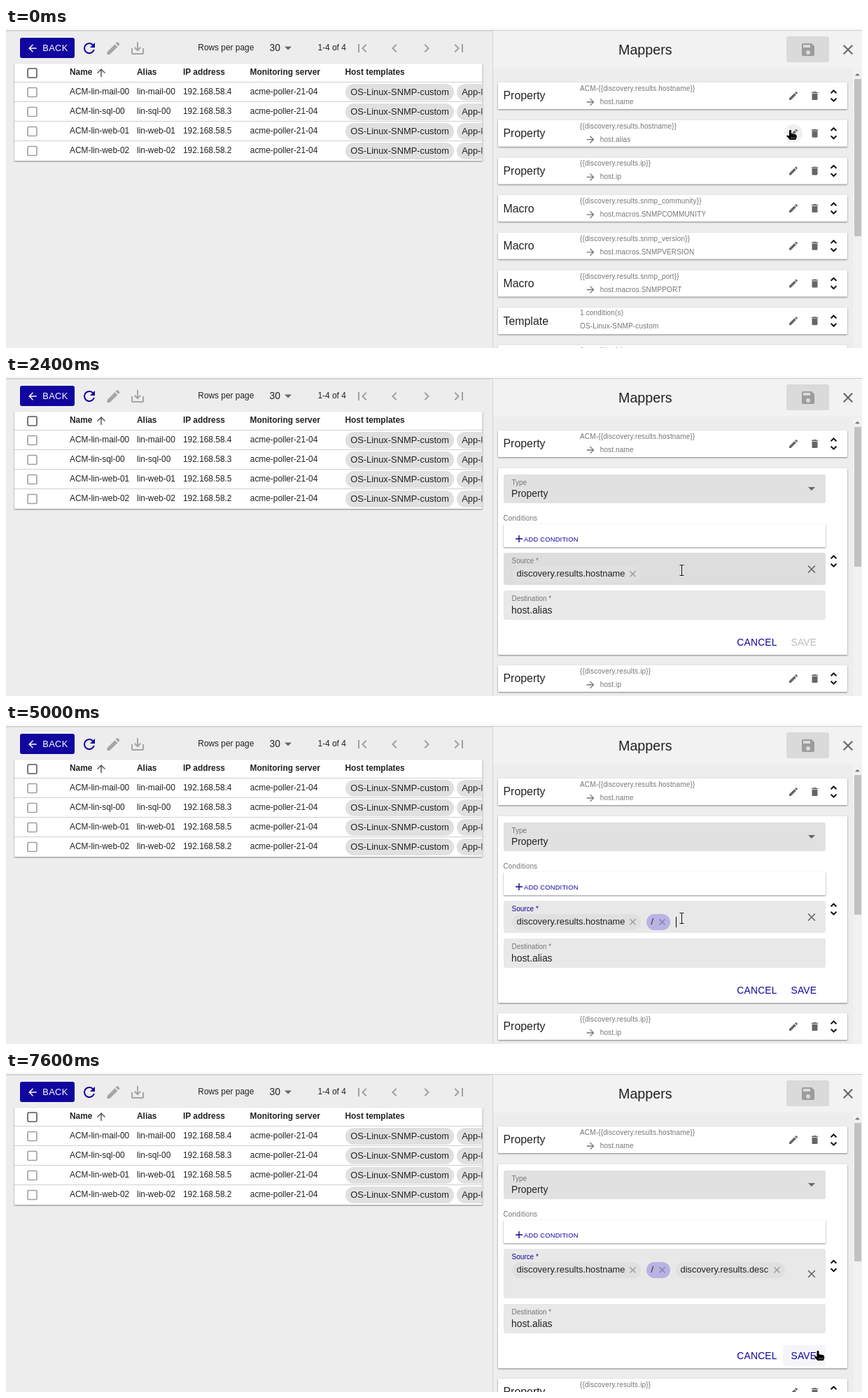
An HTML page for the animation above (8000 ms loop, 1223x458 px).

```html
<!DOCTYPE html>
<html lang="en">
<head>
<meta charset="utf-8">
<title>Mappers</title>
<style>
  html, body { margin: 0; width: 100%; height: 100%; overflow: hidden; background: #ededed; }
  svg { display: block; font-family: "Liberation Sans", Arial, sans-serif; }
  text { white-space: pre; }
  .card { fill: #fff; filter: drop-shadow(0 1px 1px rgba(0, 0, 0, .45)); }
  .menu { fill: #fff; filter: drop-shadow(0 2px 3px rgba(0, 0, 0, .35)); }
</style>
</head>
<body>
<svg width="1223" height="458" viewBox="0 0 1223 458">
  <clipPath id="table"><rect x="12" y="51" width="668.5" height="139"/></clipPath>
  <g id="base"></g>
  <g id="panel"></g>
</svg>
<script>
const LOOP = 8000, BLUE = '#10069f', DARK = '#222', GREY = '#757575';

// Icon outlines on a 24 x 24 grid
const ICONS = {
  back: 'M20 11H7.83l5.59-5.59L12 4l-8 8 8 8 1.41-1.41L7.83 13H20z',
  forward: 'M12 4l-1.41 1.41L16.17 11H4v2h12.17l-5.58 5.59L12 20l8-8z',
  up: 'M4 12l1.41 1.41L11 7.83V20h2V7.83l5.58 5.59L20 12l-8-8z',
  refresh: 'M17.65 6.35A7.96 7.96 0 0 0 12 4a8 8 0 1 0 7.73 10h-2.08A6 6 0 1 1 12 6c1.66 0 3.14.69 4.22 1.78L13 11h7V4z',
  edit: 'M3 17.25V21h3.75L17.81 9.94l-3.75-3.75zM20.71 7.04c.39-.39.39-1.02 0-1.41l-2.34-2.34c-.39-.39-1.02-.39-1.41 0l-1.83 1.83 3.75 3.75z',
  download: 'M19 12v7H5v-7H3v7c0 1.1.9 2 2 2h14c1.1 0 2-.9 2-2v-7zm-6 .67l2.59-2.58L17 11.5l-5 5-5-5 1.41-1.41L11 12.67V3h2z',
  first: 'M18.41 16.59L13.82 12l4.59-4.59L17 6l-6 6 6 6zM6 6h2v12H6z',
  prev: 'M15.41 7.41L14 6l-6 6 6 6 1.41-1.41L10.83 12z',
  next: 'M10 6L8.59 7.41 13.17 12l-4.58 4.59L10 18l6-6z',
  last: 'M5.59 7.41L10.18 12l-4.59 4.59L7 18l6-6-6-6zM16 6h2v12h-2z',
  drop: 'M7 9.5l5 5 5-5z',
  rise: 'M7 14.5l5-5 5 5z',
  save: 'M17 3H5a2 2 0 0 0-2 2v14c0 1.1.9 2 2 2h14c1.1 0 2-.9 2-2V7zm-5 16a3 3 0 1 1 0-6 3 3 0 0 1 0 6zm3-10H5V5h10z',
  close: 'M19 6.41L17.59 5 12 10.59 6.41 5 5 6.41 10.59 12 5 17.59 6.41 19 12 13.41 17.59 19 19 17.59 13.41 12z',
  trash: 'M6 19c0 1.1.9 2 2 2h8c1.1 0 2-.9 2-2V7H6zM19 4h-3.5l-1-1h-5l-1 1H5v2h14z',
  unfold: 'M12 5.83L15.17 9l1.41-1.41L12 3 7.41 7.59 8.83 9zm0 12.34L8.83 15l-1.41 1.41L12 21l4.59-4.59L15.17 15z',
  plus: 'M19 13h-6v6h-2v-6H5v-2h6V5h2v6h6z'
};

const text = (s, x, y, size, fill = DARK, extra = '') =>
  `<text x="${x}" y="${y}" font-size="${size}" fill="${fill}" ${extra}>${s}</text>`;
const box = (x, y, w, h, fill, r = 0) =>
  `<rect x="${x}" y="${y}" width="${w}" height="${h}" rx="${r}" fill="${fill}"/>`;
const card = (x, y, w, h, kind = 'card') =>
  `<rect class="${kind}" x="${x}" y="${y}" width="${w}" height="${h}" rx="1"/>`;
const icon = (name, cx, cy, size = 24, fill = GREY) =>
  `<path transform="translate(${cx - size / 2} ${cy - size / 2}) scale(${size / 24})" fill="${fill}" d="${ICONS[name]}"/>`;
const small = (s, x, y) => text(s, x, y, 10, GREY, 'letter-spacing=".15"');
const button = (s, x, y, fill) => text(s, x, y, 13.86, fill, 'letter-spacing=".2"');
const chip = (s, x, y, w) => box(x, y, w, 24, '#e0e0e0', 12) + text(s, x + 7.2, y + 16.4, 12.87);
const tag = (s, x, w, fill = '#e0e0e0', cross = '#959595') =>
  box(x, 272, w, 23, fill, 11.5) + text(s, x + 6.6, 287.4, 12.87) + icon('close', x + w - 11.5, 283.3, 15.5, cross);
const checkbox = (y, color) =>
  `<rect x="31" y="${y - 6.5}" width="13" height="13" rx="1.5" fill="none" stroke="${color}" stroke-width="1.6"/>`;

function table() {
  const hosts = [['mail-00', 4], ['sql-00', 3], ['web-01', 5], ['web-02', 2]];
  const heads = [['Name', 91], ['Alias', 187], ['IP address', 253], ['Monitoring server', 348.5], ['Host templates', 484.5]];
  let out = card(12, 51, 668.5, 139) + checkbox(64.5, '#555') + icon('up', 136, 64, 18, '#555');
  for (const [s, x] of heads) out += text(s, x, 67, 11.9, DARK, 'font-weight="bold"');
  hosts.forEach(([name, ip], i) => {
    const y = 91.5 + 28 * i, cell = (s, x) => text(s, x, y + 3.7, 11.9);
    out += box(12, y - 14.5, 668.5, 1, '#cfcfcf') + checkbox(y + .5, '#9e9e9e') +
      cell('ACM-lin-' + name, 91) + cell('lin-' + name, 187) + cell('192.168.58.' + ip, 253) +
      cell('acme-poller-21-04', 348.8) + chip('OS-Linux-SNMP-custom', 485, y - 11.5, 155) +
      chip('App-Protocol', 644, y - 11.5, 90);
  });
  return `<g clip-path="url(#table)">${out}</g>`;
}

function base() {
  let out = card(12, 51, 668.5, 139) + table() +
    box(0, 0, 1223, 3, '#fafafa') + box(0, 3, 1223, 1.5, '#cccccc') +
    card(20, 14, 78, 29).replace('class="card"', `fill="${BLUE}"`).replace('rx="1"', 'rx="3"') +
    icon('back', 38, 29, 17, '#fff') + text('BACK', 52.3, 33.2, 12.87, '#fff', 'letter-spacing=".3"') +
    icon('refresh', 119, 29, 24, BLUE) + icon('edit', 153.5, 29, 24, '#a6a6a6') + icon('download', 188, 29, 24, '#a6a6a6') +
    text('Rows per page', 274.3, 32, 11.9) + text('30', 376.5, 33, 13.86) +
    icon('drop', 403, 29, 24, '#666') + text('1-4 of 4', 445.5, 32, 11.9);
  ['first', 'prev', 'next', 'last'].forEach((s, i) => out += icon(s, 509 + 46 * i, 29, 24, '#a0a0a0'));
  return out + box(695, 4, 1, 454, '#d8d8d8') + box(696, 4, 527, 54, '#f2f2f2') + box(696, 58, 527, 400, '#ededed') +
    text('Mappers', 875, 37.8, 19.7) + box(1115, 12, 61, 37, '#dadada', 3) +
    icon('save', 1146, 31, 24, '#9c9c9c') + icon('close', 1203, 31, 24, '#666') +
    box(1210, 59, 13, 399, '#f1f1f1') + icon('rise', 1216.5, 66.5, 17, '#777');
}

const ROWS = [
  ['Property', 'ACM-{{discovery.results.hostname}}', 'host.name'],
  ['Property', '{{discovery.results.hostname}}', 'host.alias'],
  ['Property', '{{discovery.results.ip}}', 'host.ip'],
  ['Macro', '{{discovery.results.snmp_community}}', 'host.macros.SNMPCOMMUNITY'],
  ['Macro', '{{discovery.results.snmp_version}}', 'host.macros.SNMPVERSION'],
  ['Macro', '{{discovery.results.snmp_port}}', 'host.macros.SNMPPORT'],
  ['Template', '1 condition(s)', 'OS-Linux-SNMP-custom'],
  ['Template', '1 condition(s)', 'OS-Linux-SNMP-custom']
];

function row(i, y = 78 + 53.7 * i, hover = false) {
  const [kind, from, to] = ROWS[i], mid = y + 19, plain = kind === 'Template';
  return card(703, y, 499, 38) + text(kind, 710.5, mid + 5.4, 15.9) +
    small(from, 820, y + (plain ? 10.8 : 12)) +
    (plain ? small(to, 820, y + 29.8) : icon('forward', 835, y + 28, 16) + small(to, 848.7, y + 31)) +
    (hover ? `<circle cx="1125" cy="${mid}" r="13" fill="#f0f0f0"/>` : '') +
    icon('edit', 1125, mid, 16, '#666') + icon('trash', 1155.5, mid, 16, '#666') +
    icon('unfold', 1182.5, mid, 24, '#111');
}

const field = (label, y, h, fill, color = GREY) =>
  box(711, y, 460, h, fill, 3) + text(label, 722.5, y + 15.4, 10, color);

function form(t, cur) {
  const added = t >= 7100, grow = added ? 25 : 0, focus = t >= 3000;
  const inType = t >= 1200 && cur.y < 182, inSource = !focus && cur.y > 253;
  const overSave = added && cur.x > 1110 && cur.hand;
  let out = card(703, 132, 499, 267 + grow) +
    field('Type', 141, 41, t < 1200 ? '#e8e8e8' : '#e1e1e1') + text('Property', 722, 173, 13.86) +
    (inType ? icon('close', 1126, 161.5, 17, '#757575') : '') + icon('drop', 1151, 161.5, 24, '#666') +
    small('Conditions', 710.5, 207) + card(711, 212, 460, 33) +
    icon('plus', 733, 233, 17, BLUE) + text('ADD CONDITION', 740, 236.5, 9.4, BLUE, 'letter-spacing=".2"') +
    field('Source *', 253, 46 + grow, inSource ? '#dddddd' : '#e8e8e8', focus ? BLUE : GREY) +
    tag('discovery.results.hostname', 723, 184) +
    (inSource || focus ? icon('close', 1151, 276.5 + grow / 2, 18.5, '#666') : '') +
    icon('unfold', 1182.5, 265 + grow / 2, 24, '#111') +
    field('Destination *', 307 + grow, 42, '#e8e8e8') + text('host.alias', 722, 340 + grow, 13.86) +
    (overSave ? box(1110, 391, 61, 30, '#f5f5f9', 3) : '') +
    button('CANCEL', 1044.3, 386 + grow, BLUE) + button('SAVE', 1121.5, 386 + grow, t < 4900 ? '#bdbdbd' : BLUE);

  if (t >= 4900) out += tag('/', 915, 34, '#b8b3e3', '#827cae');
  else if (t >= 4100) out += text('/', 918.6, 287.4, 12.87);
  if (added) out += tag('discovery.results.desc', 957, 156);

  const caret = added || t < 3000 ? 0 : t >= 4900 ? 957 : t >= 4500 ? 926 : t >= 4100 ? 922 :
    t >= 3800 ? 918.5 : t < 3400 ? 915 : 0;
  if (caret) out += box(caret, 276, 1, 15, '#000');
  return out + row(2, 414 + grow);
}

function menu(cur) {
  const names = ['desc', 'hostname', 'ip', 'snmp_community', 'snmp_port'];
  let out = card(711, 304, 459, 170, 'menu');
  if (cur.y > 311) out += box(711, 311, 445, 32, '#ebebeb');
  names.forEach((s, i) => out += text('discovery.results.' + s, 725.3, 331.5 + 31.6 * i, 13.75));
  return out + box(1156, 304, 13, 154, '#f1f1f1') + icon('rise', 1162.7, 311.5, 17, '#888') + box(1158, 318, 10, 140, '#c1c1c1');
}

// The pointer is sampled every 100 ms, easing from one rest point to the next
const MOVES = [[1700, 8, 965.5, 278], [6300, 6, 912.5, 320], [7200, 5, 1160, 399]];

function pointer(t) {
  if (t < 1200) {
    const k = t < 200 ? 0 : t < 400 ? 1 : 2;
    return { x: 1120.5 + [0, 1.5, 2.5][k], y: 146 + [0, 2, 3][k], hand: true };
  }
  let x = 1122, y = 151;
  for (const [start, n, tx, ty] of MOVES) {
    const p = Math.min(Math.max(Math.floor((t - start) / 100) + 1, 0), n) / n, e = p * p * (3 - 2 * p);
    x += (tx - x) * e;
    y += (ty - y) * e;
  }
  return { x, y, hand: y > 385 };
}

function cursor({ x, y, hand }) {
  const beam = 'M-3-7.5H-1Q0-7.5 0-6.5Q0-7.5 1-7.5H3M0-7V7M-3 7.5H-1Q0 7.5 0 6.5Q0 7.5 1 7.5H3';
  const fist = 'M-1.6 1.3a1.6 1.6 0 0 1 3.2 0V5l5.6 1.1q2 .5 2 2.5v1.8L7.8 14H-.6L-5.4 8.6q.8-2.3 3.8.2z';
  const shape = hand
    ? `<path d="${fist}" stroke="#fff" stroke-width="1.6" paint-order="stroke"/><path d="M2 10v2.5M4.2 10v2.5M6.4 10v2.5" stroke="#bbb" stroke-width=".7"/>`
    : `<path d="${beam}" fill="none" stroke="#fff" stroke-width="2.4" opacity=".7"/><path d="${beam}" fill="none" stroke="#111" stroke-width="1.1"/>`;
  return `<g transform="translate(${x.toFixed(1)} ${y.toFixed(1)})">${shape}</g>`;
}

function panel(t) {
  const cur = pointer(t), open = t >= 1100;
  const menuOpen = (t >= 3000 && t < 3800) || (t >= 5800 && t < 7100);
  let out = box(1212, 73, 10, open ? (t >= 7100 ? 198 : 200) : 225, '#c1c1c1');
  if (open) out += row(0) + form(t, cur) + (menuOpen ? menu(cur) : '');
  else ROWS.forEach((_, i) => out += row(i, undefined, i === 1));
  return out + cursor(cur);
}

const layer = document.getElementById('panel');
let shown = '';
document.getElementById('base').innerHTML = base();

function frame() {
  const next = panel(performance.now() % LOOP);
  if (next !== shown) layer.innerHTML = shown = next;
  requestAnimationFrame(frame);
}
frame();
</script>
</body>
</html>
```
